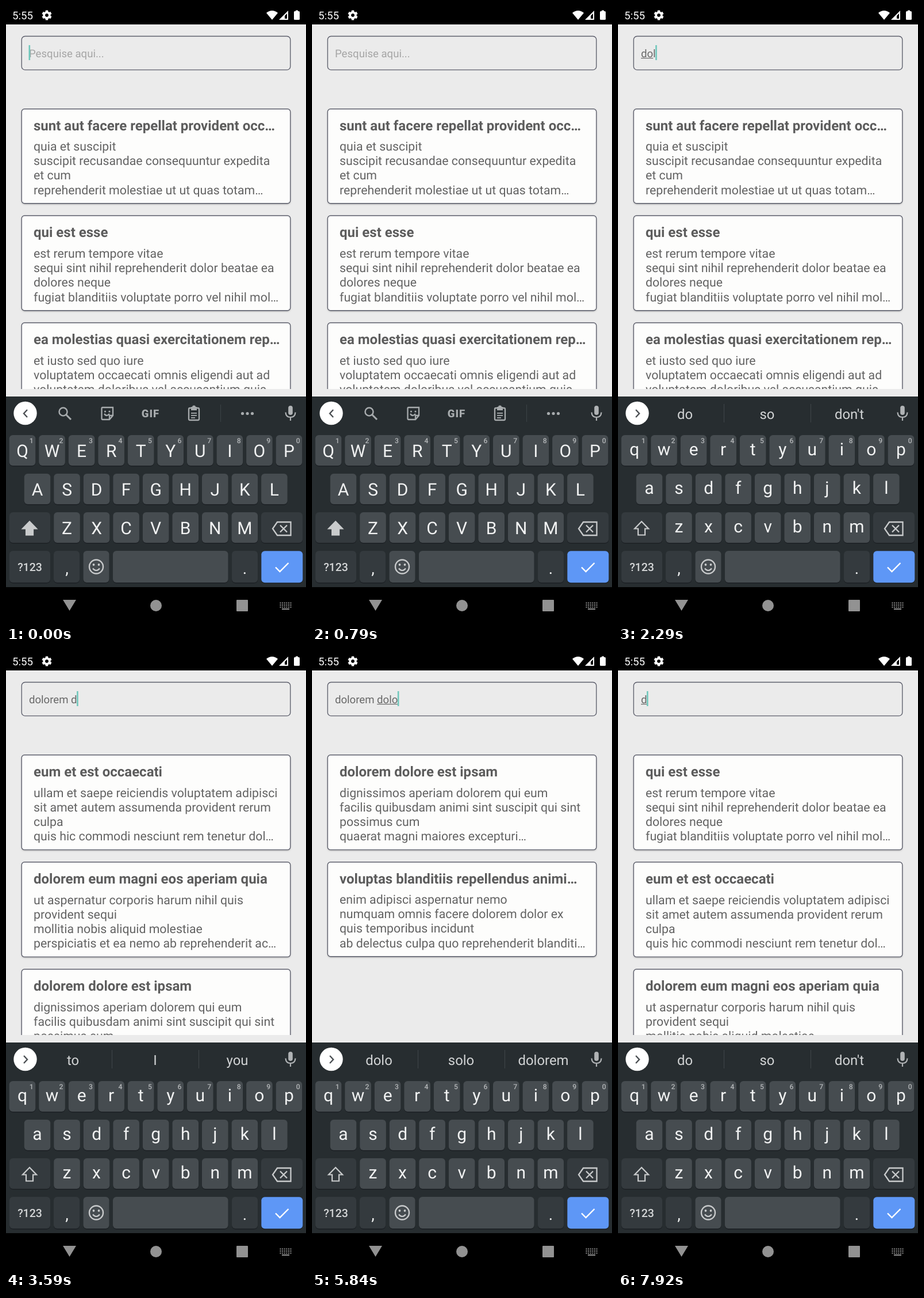
Animation of 522 by 1073 pixels, one loop 8 s. Source, as an HTML page with a canvas:

```html
<!DOCTYPE html>
<html lang="pt">
<head>
<meta charset="utf-8">
<title>Search</title>
<style>
html, body { margin: 0; width: 100%; height: 100%; overflow: hidden; background: #000; }
canvas { display: block; }
</style>
</head>
<body>
<canvas id="stage" width="522" height="1073"></canvas>
<script>
const LOOP = 8000, LAG = 120;
const g = document.getElementById('stage').getContext('2d');

const posts = {
  A: ['sunt aut facere repellat provident occ…', 'quia et suscipit', 'suscipit recusandae consequuntur expedita', 'et cum', 'reprehenderit molestiae ut ut quas totam…'],
  B: ['qui est esse', 'est rerum tempore vitae', 'sequi sint nihil reprehenderit dolor beatae ea', 'dolores neque', 'fugiat blanditiis voluptate porro vel nihil mol…'],
  C: ['ea molestias quasi exercitationem rep…', 'et iusto sed quo iure', 'voluptatem occaecati omnis eligendi aut ad', 'voluptatem doloribus vel accusantium quis', 'pariatur'],
  E: ['eum et est occaecati', 'ullam et saepe reiciendis voluptatem adipisci', 'sit amet autem assumenda provident rerum', 'culpa', 'quis hic commodi nesciunt rem tenetur dol…'],
  M: ['dolorem eum magni eos aperiam quia', 'ut aspernatur corporis harum nihil quis', 'provident sequi', 'mollitia nobis aliquid molestiae', 'perspiciatis et ea nemo ab reprehenderit ac…'],
  D: ['dolorem dolore est ipsam', 'dignissimos aperiam dolorem qui eum', 'facilis quibusdam animi sint suscipit qui sint', 'possimus cum', 'quaerat magni maiores excepturi…'],
  V: ['voluptas blanditiis repellendus animi…', 'enim adipisci aspernatur nemo', 'numquam omnis facere dolorem dolor ex', 'quis temporibus incidunt', 'ab delectus culpa quo reprehenderit blanditi…']
};
const results = [[0, 'ABC'], [2600, 'BCE'], [2950, 'BEM'], [3330, 'EMD'], [3920, 'DV'],
  [4550, 'D'], [5700, 'DV'], [6900, 'EMD'], [7400, 'BEM']];

// Times at which a character is typed, then deleted
const phrase = 'dolorem dolore';
const typed = [1500, 1850, 2250, 2420, 2640, 2850, 3050, 3250, 3550, 3720, 3940, 4100, 4220, 4330];
const deleted = [5400, 5600, 6050, 6130, 6290, 6420, 6640, 6850, 7200, 7360, 7500, 7650, 7820];
const edits = [[0, ''], ...typed.map((t, i) => [t, phrase.slice(0, i + 1)]),
  ...deleted.map((t, i) => [t, phrase.slice(0, 13 - i)])];

const hints = {
  '': 'to I you', d: "do so don't", do: "do so don't", dol: 'dol doll dolls',
  dolo: 'dolo solo dolorem', dolor: 'dolor color dolorem',
  dolore: 'dolor dolorem Dolores', dolorem: 'dolorem Dolores dolores'
};

const at = (list, t) => list.findLast(e => e[0] <= t) || list[0];
const lastWord = s => s.split(' ').pop();

function text(s, x, y, size, color, align = 'left', weight = 400) {
  g.font = `${weight} ${size}px Roboto, sans-serif`;
  g.textAlign = align;
  g.fillStyle = color;
  g.fillText(s, x, y);
}
function rect(x, y, w, h, color) {
  g.fillStyle = color;
  g.fillRect(x, y, w, h);
}
function box(x, y, w, h, r, fill, stroke) {
  g.beginPath();
  g.roundRect(x, y, w, h, r);
  paint(fill, stroke, 1.35);
}
function disc(x, y, r, fill, stroke, width) {
  g.beginPath();
  g.arc(x, y, r, 0, 7);
  paint(fill, stroke, width);
}
function shape(d, fill, stroke, width) {
  const p = new Path2D(d);
  paint(fill, stroke, width, p);
}
function paint(fill, stroke, width = 2, p) {
  if (fill) { g.fillStyle = fill; p ? g.fill(p) : g.fill(); }
  if (stroke) {
    g.strokeStyle = stroke;
    g.lineWidth = width;
    p ? g.stroke(p) : g.stroke();
  }
}

function statusBar() {
  rect(0, 0, 522, 32, '#000');
  text('5:55', 11, 23, 18.6, '#fff');
  for (let i = 0; i < 6; i++) {
    g.save();
    g.translate(71, 16);
    g.rotate(i * Math.PI / 3);
    rect(-2.2, -8.5, 4.4, 6, '#fff');
    g.restore();
  }
  disc(71, 16, 4.9, null, '#fff', 3.6);
  disc(71, 16, 2.8, '#000');
  shape('M463 24L453 12Q463 4 473 12Z', '#fff');
  shape('M475 24L491 8V24Z', '#fff');
  shape('M485 17L489 13V22H485Z', '#000');
  box(501, 9, 10, 15, 1.5, '#fff');
  rect(504, 7.5, 4, 2, '#fff');
}

function searchBox(t) {
  box(27.2, 52.5, 467.6, 58.4, 6, null, '#5d5f6c');
  const [since, value] = at(edits, t);
  if (!value) text('Pesquise aqui...', 40, 88.5, 18.6, '#a5a5a5');
  text(value, 40, 88.5, 18.6, '#686868');
  const width = s => g.measureText(s).width;
  const end = 40 + width(value);
  const before = at(edits, t - LAG)[1];
  const shown = before.length < value.length ? before : value;
  const start = shown.length - lastWord(shown).length;
  const from = width(shown.slice(0, start)), to = width(shown);
  if (to > from) rect(40 + from, 90, to - from, 1.2, '#686868');
  if ((t - since) % 1000 < 500) rect(end - 0.5, 68, 2.6, 26, '#70c8bc');
}

function card([title, ...lines], y) {
  const pitch = title.endsWith('…') ? 185.3 : 186;
  g.shadowColor = 'rgba(0,0,0,.28)';
  g.shadowBlur = 3;
  g.shadowOffsetY = 1.5;
  box(27.2, y, 467.6, pitch - 21.3, 5, '#fdfdfc');
  g.shadowColor = 'transparent';
  box(27.2, y, 467.6, pitch - 21.3, 5, null, '#5d5f6c');
  text(title, 48, y + 37.3, 24, '#5c5c5c', 'left', 700);
  lines.forEach((s, i) => text(s, 48, y + pitch - 112.8 + i * 25.13, 21.27, '#636363'));
  return y + pitch;
}

function cards(t) {
  g.save();
  g.beginPath();
  g.rect(0, 112, 522, 553);
  g.clip();
  let y = 178.7;
  for (const id of at(results, t)[1]) y = card(posts[id], y);
  g.restore();
}

function key(x, y, w, color, h = 53) {
  box(x, y + 1.5, w, h, 6, '#1d2125');
  box(x, y, w, h, 6, color);
}

function mic() {
  const c = '#b0b3b5';
  box(491.2, 694, 7.6, 16, 3.8, c);
  shape('M486.5 705.5Q487 714 495 714Q503 714 503.5 705.5M495 714V720', null, c, 2.2);
}

function toolbar() {
  const c = '#a7abad';
  shape('M37 701L31 707.5L37 714', null, '#4c5054', 2.4);
  disc(99.5, 704.5, 7, null, c, 2.5);
  shape('M104.5 709.5L113 718', null, c, 3);
  shape('M168 697H186V711L180 718H168Q166.500 718 166.500 716V699Q166.500 697 168 697ZM186 711H180V718M171 708Q175 714 180 708', null, c, 2.3);
  disc(172.5, 704, 1.6, c);
  disc(180, 704, 1.6, c);
  g.letterSpacing = '1px';
  text('GIF', 251.5, 714, 18.6, c, 'center', 900);
  g.letterSpacing = '0px';
  box(318, 698, 18, 21, 2, null);
  paint(null, c, 2.3);
  rect(322, 696, 10, 6, c);
  disc(327, 696.5, 3, c);
  for (const y of [706, 710, 714]) rect(322, y, y > 712 ? 7 : 10, 1.8, c);
  rect(373, 692, 1, 30, '#3b4246');
  for (const x of [411.5, 420, 428.5]) disc(x, 707.5, 2.6, c);
}

function suggestions(value) {
  shape('M31 701L37 707.5L31 714', null, '#4c5054', 2.4);
  hints[lastWord(value)].split(' ').forEach((s, i) =>
    text(s, 116.5 + 143 * i, 716.5, 23.9, '#d2d4d5', 'center'));
  for (const x of [184, 335]) rect(x, 691, 1, 32, '#40464a');
}

function keyboard(t) {
  rect(0, 678, 522, 331, '#272d30');
  const value = at(edits, t)[1];
  const caps = !value;
  disc(33.5, 707, 20.2, '#fff');
  const settled = at(edits, t - LAG)[1];
  if (settled) suggestions(settled);
  else toolbar();
  mic();

  const light = '#464c50', dark = '#343a3e', ink = '#f1f2f2', icon = '#c9cbcc';
  ['qwertyuiop', 'asdfghjkl', 'zxcvbnm'].forEach((row, r) => {
    const first = [28.5, 54.5, 106][r], y = 745 + 67 * r;
    [...row].forEach((c, i) => {
      const x = first + 51.55 * i;
      key(x - 22.8, y, 45.6, light);
      text(caps ? c.toUpperCase() : c, x, y + (caps ? 38 : 35), 30, ink, 'center');
      if (!r) text((i + 1) % 10, x + 15.8, y + 14.3, 12.2, '#b4b7b9', 'center', 500);
    });
  });
  key(6, 879, 71, dark);
  shape('M41 895L53 907.500H47V918.500H35V907.500H29Z', caps && icon, icon, 2.2);
  key(444, 879, 72, dark);
  shape('M472 896H495.500V919H472L464 907.500ZM477 901.500L489 913.500M489 901.500L477 913.500', null, icon, 2.3);

  key(6, 946, 71, dark, 55);
  text('?123', 41.5, 981, 19.5, '#d5d7d8', 'center', 500);
  key(83, 946, 45, dark, 55);
  text(',', 106, 986, 28, ink, 'center');
  key(134.5, 946, 45, light, 55);
  disc(157, 973.5, 12, null, icon, 2.4);
  disc(152.5, 970, 1.9, icon);
  disc(161.5, 970, 1.9, icon);
  shape('M151 976.500Q157 983.500 163 976.500', null, icon, 2.2);
  key(186, 946, 200.5, light, 55);
  key(393, 946, 45, dark, 55);
  text('.', 415.5, 986, 28, ink, 'center');
  key(444.3, 946.3, 72, '#5e97f6', 55);
  shape('M469 974.500L476.500 982L491.500 967', null, '#fff', 2.4);
}

function navBar() {
  const c = '#929292';
  rect(0, 1009, 522, 64, '#000');
  shape('M99 1031H122L110.500 1050Z', c);
  disc(261, 1041, 10, c);
  box(401, 1031, 20, 20, 1, c);
  for (let r = 0; r < 3; r++)
    for (let i = 0; i < 6; i++) rect(476.5 + 3.6 * i, 1035.5 + 3.6 * r, 2, 2, c);
  rect(480, 1046, 13, 2, c);
}

function draw() {
  const t = performance.now() % LOOP;
  g.textRendering = 'geometricPrecision';
  rect(0, 0, 522, 1073, '#ebebeb');
  statusBar();
  searchBox(t);
  cards(t);
  keyboard(t);
  navBar();
  requestAnimationFrame(draw);
}
draw();
</script>
</body>
</html>
```
